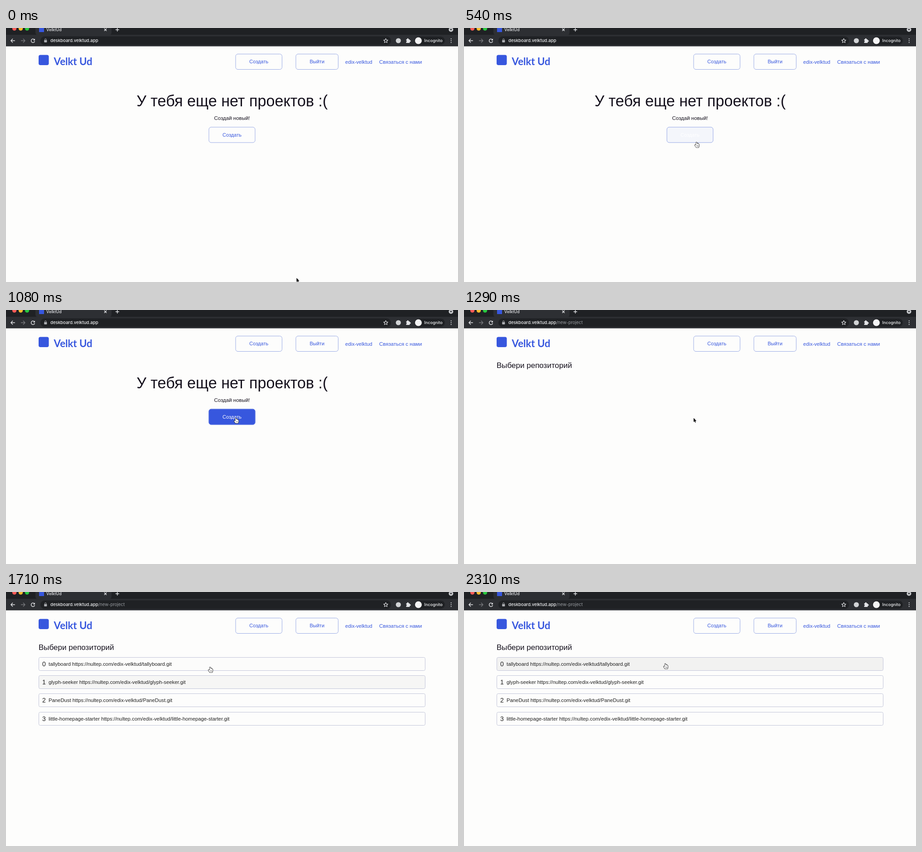
These frames come from a looping animation (998x561 px, 2.34 s). An HTML page with a canvas:

```html
<!DOCTYPE html>
<html lang="ru">
<head>
<meta charset="utf-8">
<style>
  html, body { margin: 0; width: 998px; height: 561px; overflow: hidden; background: #fdfdfc; }
  canvas { display: block; }
</style>
</head>
<body>
<canvas id="stage" width="998" height="561"></canvas>
<script>
const ctx = document.getElementById('stage').getContext('2d');
const LOOP = 2340, PAGE_AT = 1100, LIST_AT = 1400;
const BLUE = '#3757de', LINE = '#9aabe6', ICON = '#e4e5e8';
const SANS = '"Liberation Sans", Arial, sans-serif';
const UI = 'Inter, sans-serif';
const HOST = 'https://nultep.com/edix-velktud/';
const REPOS = ['tallyboard', 'glyph-seeker', 'PaneDust', 'little-homepage-starter'];
// When the pointer enters and leaves each row
const ROW_HOVER = [[1705, LOOP], [1646, 1682], [1595, 1630]];
const BUTTON_HOVER = 532;

const clamp = v => Math.max(0, Math.min(1, v));
const smooth = v => { v = clamp(v); return v * v * (3 - 2 * v); };
const mix = (a, b, k) => a + (b - a) * k;

function text(str, x, y, size, color, { font = SANS, weight = 400, align = 'left' } = {}) {
  ctx.font = `${weight} ${size}px ${font}`;
  ctx.textAlign = align;
  ctx.fillStyle = color;
  ctx.fillText(str, x, y);
  return ctx.measureText(str).width;
}

function box(x, y, w, h, r, fill, stroke) {
  ctx.beginPath();
  ctx.roundRect(x, y, w, h, r);
  if (fill) { ctx.fillStyle = fill; ctx.fill(); }
  if (stroke) { ctx.strokeStyle = stroke; ctx.lineWidth = 1; ctx.stroke(); }
}

function dot(x, y, r, color) {
  ctx.beginPath();
  ctx.arc(x, y, r, 0, 7);
  ctx.fillStyle = color;
  ctx.fill();
}

function path(d, x, y, { fill, stroke, width = 1.4 } = {}) {
  const shape = new Path2D(d);
  ctx.save();
  ctx.translate(x, y);
  ctx.lineJoin = 'round';
  ctx.lineWidth = width;
  if (stroke) { ctx.strokeStyle = stroke; ctx.stroke(shape); }
  if (fill) { ctx.fillStyle = fill; ctx.fill(shape); }
  ctx.restore();
}

function button(label, x, y, w, hover = 0, active = false) {
  const fill = `rgba(55,87,222,${hover})`;
  box(x + .5, y + .5, w - 1, 34, 5, fill, LINE);
  box(x + .5, y + .5, w - 1, 34, 5, null, fill);
  text(label, x + w / 2, y + 21, 11, active ? '#fff' : BLUE, { align: 'center' });
}

function browser(onNewPage) {
  ctx.fillStyle = '#1f2124';
  ctx.fillRect(0, 0, 998, 15);
  ctx.fillStyle = '#2d2f33';
  ctx.fillRect(0, 15, 998, 25.5);
  box(65, -8, 168, 24, 6, '#2d2f33');
  ['#fc5b57', '#fdbc2e', '#28c83f'].forEach((c, i) => dot(18.5 + 14 * i, 1.2, 4.6, c));

  ctx.fillStyle = BLUE;
  ctx.fillRect(73, -2, 11, 11);
  text('VelktUd', 89, 6.5, 9, ICON, { font: UI, weight: 500 });
  path('M-2.6-2.6L2.6 2.6M2.6-2.6L-2.6 2.6', 219.5, 3.8, { stroke: ICON });
  path('M-4 0H4M0-4V4', 245.8, 3.8, { stroke: ICON });
  dot(982.5, 3.5, 5, '#c6c8cb');
  path('M-2.5-1.2H2.5L0 2Z', 982.5, 3.5, { fill: '#1f2124' });

  path('M-4.5 0H4.5M-.3-4.2L-4.5 0L-.3 4.2', 15.3, 28, { stroke: ICON });
  path('M4.5 0H-4.5M.3-4.2L4.5 0L.3 4.2', 37.5, 28, { stroke: '#75777b' });
  path('M3.4-2A4 4 0 1 0 3.9 1.2', 59.5, 28, { stroke: ICON });
  path('M4.4-4.6V-.6H.4Z', 59.5, 28, { fill: ICON });

  box(76, 18.5, 774, 19, 9.5, '#1f2124');
  box(84.2, 26.8, 6.2, 5, 1, '#aeb0b4');
  path('M-1.7 0V-1.6A1.7 1.7 0 0 1 1.7-1.6V0', 87.3, 27, { stroke: '#aeb0b4', width: 1 });
  const w = text('deskboard.velktud.app', 98, 31.3, 9.6, '#f1f2f4', { font: UI, weight: 500 });
  if (onNewPage) text('/new-project', 98 + w, 31.3, 9.6, '#9a9da2', { font: UI });

  path('M0-4.8L1.4-1.6L4.8-1.3L2.2 1L3 4.4L0 2.6L-3 4.4L-2.2 1L-4.8-1.3L-1.4-1.6Z',
    838.5, 28, { stroke: ICON, width: 1.1 });
  dot(866.3, 28, 5.6, '#d2d4d6');
  box(883.5, 25, 8, 8, 1, ICON);
  dot(887.2, 24.6, 1.8, ICON);
  dot(892, 28.8, 1.8, ICON);
  dot(883.5, 29, 1.4, '#2d2f33');
  box(902, 19, 67, 18, 9, '#1f2124');
  dot(910.5, 28, 7.5, '#f4f4f5');
  text('Incognito', 923.5, 31.3, 9.1, '#f1f2f4', { font: UI, weight: 500 });
  [-4, 0, 4].forEach(dy => dot(982.8, 28 + dy, 1.1, ICON));
}

function header() {
  box(72, 59.5, 22.5, 22.5, 4, BLUE);
  text('Velkt Ud', 105.5, 82, 22.2, BLUE, { font: 'Lato, sans-serif', weight: 700 });
  button('Создать', 506.5, 57, 103.5);
  button('Выйти', 639.5, 57, 94.5);
  text('edix-velktud', 749, 78.5, 11.2, BLUE);
  text('Связаться с нами', 824, 78.5, 11.5, BLUE);
}

function emptyPage(t) {
  text('У тебя еще нет проектов :(', 499.3, 173, 34.15, '#15111d', { align: 'center' });
  text('Создай новый!', 499, 203, 11.5, '#15111d', { align: 'center' });
  button('Создать', 447.5, 218.5, 103, clamp((t - BUTTON_HOVER) / 200), t >= BUTTON_HOVER);
}

function repoPage(t) {
  text('Выбери репозиторий', 72, 128, 17, '#15111d');
  if (t < LIST_AT) return;
  REPOS.forEach((name, i) => {
    const y = 145 + Math.round(40.2 * i);
    const [enter, leave] = ROW_HOVER[i] || [LOOP, LOOP];
    const hover = clamp((t - enter) / 60) * (1 - clamp((t - leave) / 80));
    box(72.5, y - .5, 853, 29, 3, `rgba(0,0,0,${.045 * hover})`, '#c2c5d9');
    text(i, 80, y + 19, 14, '#222');
    text(`${name} ${HOST}${name}.git`, 94, y + 18, 11.3, '#222');
  });
}

function pointer(t) {
  const first = smooth((t - 60) / 550), second = smooth((t - 1590) / 150);
  const x = mix(mix(641.5, 507, first), 444, second);
  const y = mix(mix(552, 238.5, first), 158, second);
  const overButton = t >= BUTTON_HOVER && t < PAGE_AT;
  const overRow = ROW_HOVER.some(([enter, leave]) => t >= enter && t < leave);
  if (overButton || overRow) {
    path('M-.9.8Q0-.5.9.8V4.2Q2 0 2.7 4.6Q4 0 4.5 5Q5.8 3.8 6 5.8V8.2L4.9 11.6H-.6L-3.4 7.6Q-4.2 5.6-2.5 6L-.9 7.3Z',
      x + .4, y, { fill: '#fff', stroke: '#222', width: 1.5 });
    path('M.9 7V9.8M2.6 7V9.8M4.2 7V9.8', x + .4, y, { stroke: '#555', width: .7 });
  } else {
    path('M0 0V8.9L2 7.1L3.4 10.3L4.9 9.6L3.5 6.6H6.2Z', x, y, { fill: '#000', stroke: '#fff', width: 1.6 });
  }
}

function draw(now) {
  const t = now % LOOP, onNewPage = t >= PAGE_AT;
  ctx.fillStyle = '#fdfdfc';
  ctx.fillRect(0, 0, 998, 561);
  browser(onNewPage);
  header();
  (onNewPage ? repoPage : emptyPage)(t);
  pointer(t);
}

const start = performance.now();
(function tick() {
  draw(performance.now() - start);
  requestAnimationFrame(tick);
})();
</script>
</body>
</html>
```
